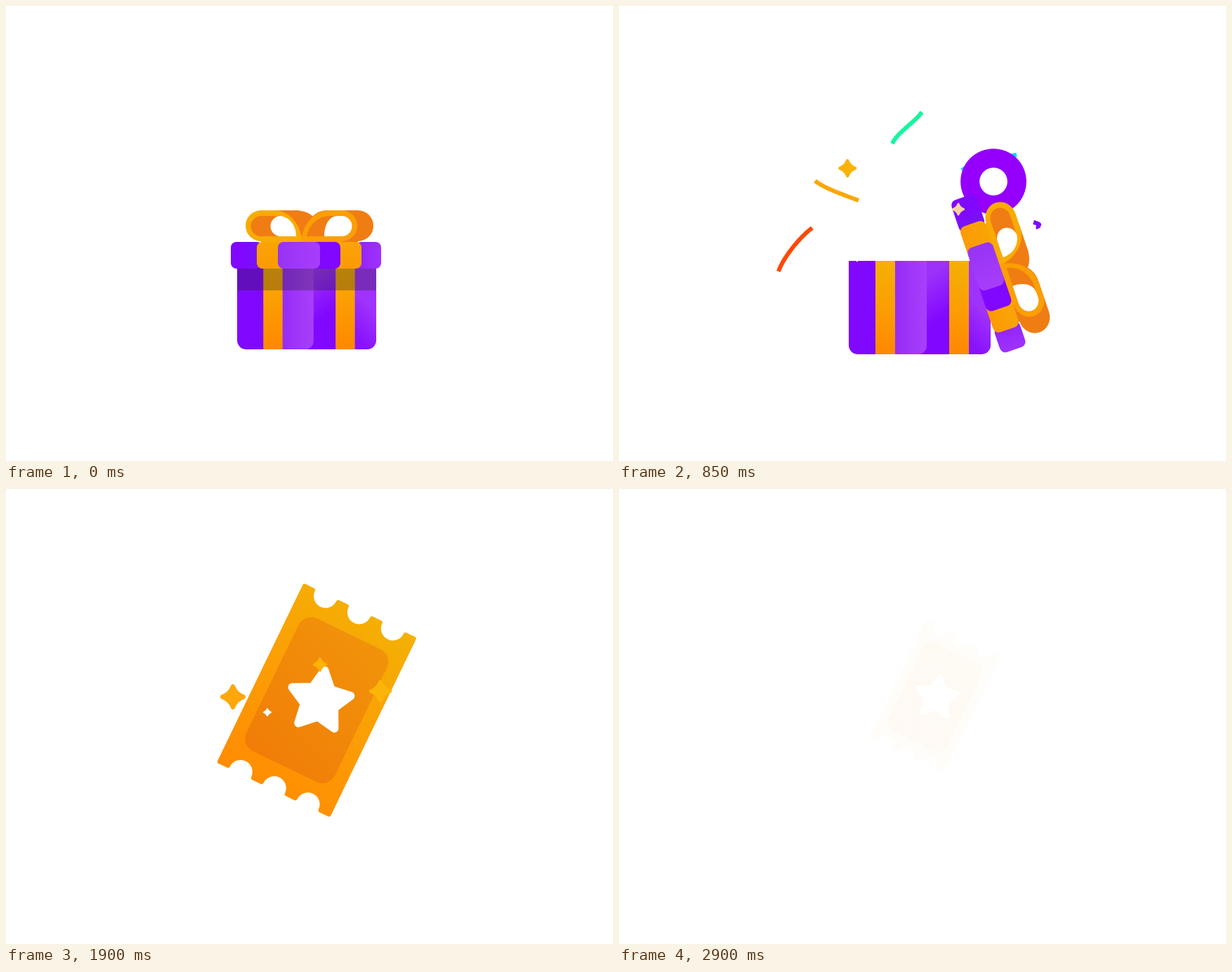
Animation of 864x648 px, one loop 3000 ms. Source, as an HTML page with a canvas:

```html
<!DOCTYPE html>
<html>
<head>
<meta charset="utf-8">
<style>
html, body { margin: 0; width: 100%; height: 100%; overflow: hidden; background: #fff; }
canvas { display: block; }
</style>
</head>
<body>
<canvas id="stage" width="864" height="648"></canvas>
<script>
const W = 864, H = 648, PI = Math.PI, RAD = PI / 180;
const stage = document.getElementById('stage').getContext('2d');
const buffer = document.createElement('canvas');
buffer.width = W;
buffer.height = H;
const g = buffer.getContext('2d');

// Progress from 0 to 1 over a span of time.
const span = (t, start, length) => Math.max(0, Math.min(1, (t - start) / length));
const smooth = x => x * x * (3 - 2 * x);

// Draws a group off screen, then blends it in with blur.
function layer(blur, draw) {
  g.clearRect(0, 0, W, H);
  g.save();
  draw();
  g.restore();
  stage.save();
  if (blur > 0.1) stage.filter = `blur(${blur}px)`;
  stage.drawImage(buffer, 0, 0);
  stage.restore();
}

function grad(x0, y0, x1, y1, ...colors) {
  const s = g.createLinearGradient(x0, y0, x1, y1);
  colors.forEach((c, i) => s.addColorStop(i / (colors.length - 1), c));
  return s;
}

function box(x, y, w, h, r, fill, c = g) {
  c.fillStyle = fill;
  c.beginPath();
  c.roundRect(x, y, w, h, r);
  c.fill();
}

function shape(d, fill) {
  g.fillStyle = fill;
  g.fill(new Path2D(d));
}

// ---- gift ----
const wobble = t => .24 * Math.sin(2 * PI * span(t, 0, 300)) * (1 - span(t, 0, 300));
const flight = t => span(t, 300, 500);

function zoomGift(t) {
  const s = (1 + .1 * smooth(span(t, 950, 150))) * (1 - span(t, 1140, 212));
  g.translate(428, 362);
  g.scale(s, s);
  g.translate(-428, -362);
}

function drawBody(t) {
  const u = flight(t), w = wobble(t);
  zoomGift(t);
  g.translate(428, 489 + 7 * span(t, 600, 250));
  g.scale(.98 + .02 * u + w, 1 + .04 * Math.sin(PI * u) - .8 * w);
  const ribbon = grad(0, -133, 0, 0, '#f4b005', '#fb9e03', '#ff8700');
  g.beginPath();
  g.roundRect(-101, -133, 202, 133, [0, 0, 13, 13]);
  g.clip();
  box(-101, -133, 40, 133, 0, '#8008ff');
  box(-15, -133, 59, 133, 0, grad(10, -110, 44, -60, '#9c31fa', '#8207ff'));
  box(-36, -133, 46, 133, [0, 0, 12, 0], grad(-36, 0, 10, 0, '#962cf5', '#a83ffc'));
  box(69, -133, 33, 133, 0, grad(69, -20, 101, -50, '#8812fc', '#9f32fb'));
  box(-63, -133, 28, 133, 0, ribbon);
  box(42, -133, 28, 133, 0, ribbon);
  box(-101, -133, 202, 49, 0, `rgba(30,30,30,${.29 * (1 - span(t, 300, 100))})`);
}

function drawLid(t) {
  const u = flight(t), w = wobble(t);
  zoomGift(t);
  g.translate(427 + 98.8 * u, 355 + 26 * u - 537 * u * (1 - u) ** 2.5 + 100 * w);
  g.rotate(71.2 * RAD * (1 - (1 - u) ** 1.25));
  g.scale(1 + .07 * u * u + w, 1 - .8 * w);
  g.translate(-427, -355);
  // bow
  shape('M380 291H415Q435 293 440 305L425 337H363Z', '#f07d14');
  shape('M455 291H501A22 22 0 0 1 501 335V337H420C422 310 438 292 455 291Z', '#f07d14');
  shape('M363 291H385C405 293 420 312 422 337H363V335A22 22 0 0 1 363 291Z', '#f9ab05');
  shape('M420 337C422 310 440 291 460 291H478A22 22 0 0 1 478 335V337Z', '#fb9f04');
  shape('M363 299H383C400 300 412 315 413 328H363A14.5 14.5 0 0 1 363 299Z', '#f07d14');
  shape('M428 328C430 312 445 299 460 299H478A14.5 14.5 0 0 1 478 328Z', '#f07d14');
  g.globalCompositeOperation = 'destination-out';
  shape('M391 299C404 301 413 313 413 328H391A14.5 14.5 0 0 1 391 299Z', '#000');
  shape('M453 328C453 310 461 299 472 299H478A14.5 14.5 0 0 1 478 328Z', '#000');
  g.globalCompositeOperation = 'source-over';
  // rim
  const ribbon = grad(0, 336, 0, 374, '#f9a406', '#fc9a03');
  box(320, 336, 45, 38, 8, grad(320, 0, 362, 0, '#8008ff', '#8008ff', '#7418ee'));
  box(498, 336, 36, 38, 8, grad(506, 0, 534, 0, '#9426fb', '#9f32fb'));
  box(470, 336, 36, 38, [0, 8, 8, 0], ribbon);
  box(357, 336, 36, 38, [8, 0, 0, 8], ribbon);
  box(436, 336, 40, 38, [0, 8, 8, 0], '#8008ff');
  box(387, 336, 60, 38, 8, grad(387, 0, 447, 0, '#9833f4', '#a73efb'));
}

function drawGift(t) {
  if (t >= 1350) return;
  const shrink = 3 * span(t, 1150, 100);
  const spin = 2.2 * Math.max(0, 1 - Math.abs(t - 570) / 200);
  layer(shrink, () => drawBody(t));
  layer(shrink + spin, () => drawLid(t));
}

// ---- ticket ----
function ticketOutline(w, h) {
  const tab = 19.4, pitch = (2 * w - tab) / 3, notch = (pitch - tab) / 2;
  const path = new Path2D();
  for (const side of [1, -1]) {
    const edge = new Path2D();
    edge.moveTo(-w, 0);
    for (let i = 0; i < 4; i++) {
      const x = -w + i * pitch, end = x + tab;
      edge.arcTo(x, -h, end, -h, 3);
      edge.arcTo(end, -h, end, 0, 3);
      if (i < 3) edge.arc(end + notch, 3 - h, notch, PI, 0, true);
    }
    edge.lineTo(w, 0);
    path.addPath(edge, new DOMMatrix([side, 0, 0, side, 0, 0]));
  }
  return path;
}
const outline = ticketOutline(89.5, 142);

function drawTicket(t) {
  const s = 1 - (1 - span(t, 1100, 280)) ** 4
    + .185 * smooth(span(t, 2250, 320)) - .535 * smooth(span(t, 2570, 360));
  if (!s) return;
  stage.save();
  stage.translate(464.3, 286.3);
  stage.scale(s, s);
  stage.translate(-22, 14.5);
  stage.rotate(25.8 * RAD);
  // paper and panel fade separately, so the panel stays visible longest
  stage.globalAlpha = 1 - span(t, 2250, 665);
  stage.fillStyle = grad(60, -142, -20, 142, '#f4b004', '#fb9f05', '#ff8d02');
  stage.fill(outline);
  box(-70, -105, 140, 210, 20, grad(40, -105, -40, 105, '#f1930a', '#f17d08'), stage);
  stage.globalAlpha = 1;
  // star
  stage.translate(4.7, -1);
  stage.rotate(-17.4 * RAD);
  stage.beginPath();
  for (let i = 0; i < 10; i++) {
    const r = i % 2 ? 22.5 : 44, a = i * 36 * RAD;
    stage.lineTo(r * Math.sin(a), -r * Math.cos(a));
  }
  stage.closePath();
  stage.fillStyle = stage.strokeStyle = '#fff';
  stage.lineWidth = 12;
  stage.lineJoin = 'round';
  stage.fill();
  stage.stroke();
  stage.restore();
}

// ---- confetti ----
// Colour and key points of each flight; all start at the box mouth.
const MOUTH = [428, 362];
const STREAMERS = [
  ['#fb4a06', [354, 323], [320, 311], [275, 316], [227, 378], [230, 445]],
  ['#fba806', [428, 343], [402, 297], [341, 277], [279, 249], [245, 205]],
  ['#17f5a0', [400, 248], [396, 240], [389, 196], [431, 151], [440, 115]],
  ['#12d8ee', [470, 300], [475, 280], [488, 234], [566, 212], [620, 215]],
  ['#8008ff', [503, 284], [507, 291], [590, 308], [597, 317], [610, 345]]
];

// Point on a smooth curve through pts; u counts points.
function along(pts, u) {
  const i = Math.min(Math.floor(u), pts.length - 2), f = u - i;
  const p = k => pts[Math.max(0, Math.min(pts.length - 1, i + k))];
  return [0, 1].map(k => {
    const a = p(-1)[k], b = p(0)[k], c = p(1)[k], d = p(2)[k];
    return b + f / 2 * (c - a + f * (2 * a - 5 * b + 4 * c - d + f * (3 * (b - c) + d - a)));
  });
}

function drawStreamers(t) {
  const pos = 1 + (t - 600) / 125;
  const tail = Math.max(0, pos), head = Math.min(5, pos + 1);
  if (head <= tail) return;
  stage.lineWidth = 6;
  for (const [color, ...pts] of STREAMERS) {
    stage.strokeStyle = color;
    stage.beginPath();
    for (let i = 0; i <= 16; i++) {
      stage.lineTo(...along([MOUTH, ...pts], tail + (head - tail) * i / 16));
    }
    stage.stroke();
  }
}

// x, y, radius, colour; they burst one after another
const RINGS = [
  [533, 250, 62, '#9400fb'],
  [307, 311, 34.6, '#2bb4dd'],
  [397, 226, 45, '#fc9a05']
];

function drawRings(t) {
  RINGS.forEach(([x, y, r, color], i) => {
    const p = span(t, 700 + 155 * i, 400);
    if (p === 0 || p === 1) return;
    stage.fillStyle = color;
    stage.beginPath();
    stage.arc(x, y, r * (1 - (1 - p) ** 3), 0, 7);
    stage.arc(x, y, r * p ** 1.16, 7, 0, true);
    stage.fill('evenodd');
  });
}

// ---- sparkles ----
function sparkle(x, y, r, color) {
  if (r < .5) return;
  const k = .83 * r, q = .22 * r;
  stage.fillStyle = stage.strokeStyle = color;
  stage.lineWidth = .34 * r;
  stage.lineJoin = 'round';
  stage.beginPath();
  stage.moveTo(x, y - k);
  stage.quadraticCurveTo(x + q, y - q, x + k, y);
  stage.quadraticCurveTo(x + q, y + q, x, y + k);
  stage.quadraticCurveTo(x - q, y + q, x - k, y);
  stage.quadraticCurveTo(x - q, y - q, x, y - k);
  stage.closePath();
  stage.fill();
  stage.stroke();
}

// x, y, delay, peak radius, colour
const TWINKLES = [
  [323, 296, 0, 20, '#fca70c'],
  [447, 250, 110, 21, '#fcb206'],
  [533, 288, 20, 19, '#fcb408'],
  [372, 318, 70, 9, '#fff'],
  [483, 187, 410, 9.6, '#fdd0a0'],
  [339, 258, 300, 7, '#fff']
];

function drawTwinkles(t, dy) {
  for (const [x, y, delay, r, color] of TWINKLES) {
    sparkle(x, y + dy, r * Math.sin(PI * span(t, delay, 560)), color);
  }
}

function drawFlyingStar(t) {
  const p = span(t, 600, 450);
  sparkle(428 - 185 * p, 350 - 214 * p, 13.2 * Math.sin(PI * p), '#fcb206');
}

function render(t) {
  stage.clearRect(0, 0, W, H);
  drawStreamers(t);
  drawFlyingStar(t);
  drawRings(t);
  drawGift(t);
  drawTwinkles(t - 100, 102.5);
  drawTicket(t);
  drawTwinkles(t - 1700, 0);
}

const begin = performance.now();
function tick() {
  const t = (performance.now() - begin) % 3000;
  render(Math.min(2900, Math.floor(t / 50) * 50)); // 20 steps per second
  requestAnimationFrame(tick);
}
tick();
</script>
</body>
</html>
```
